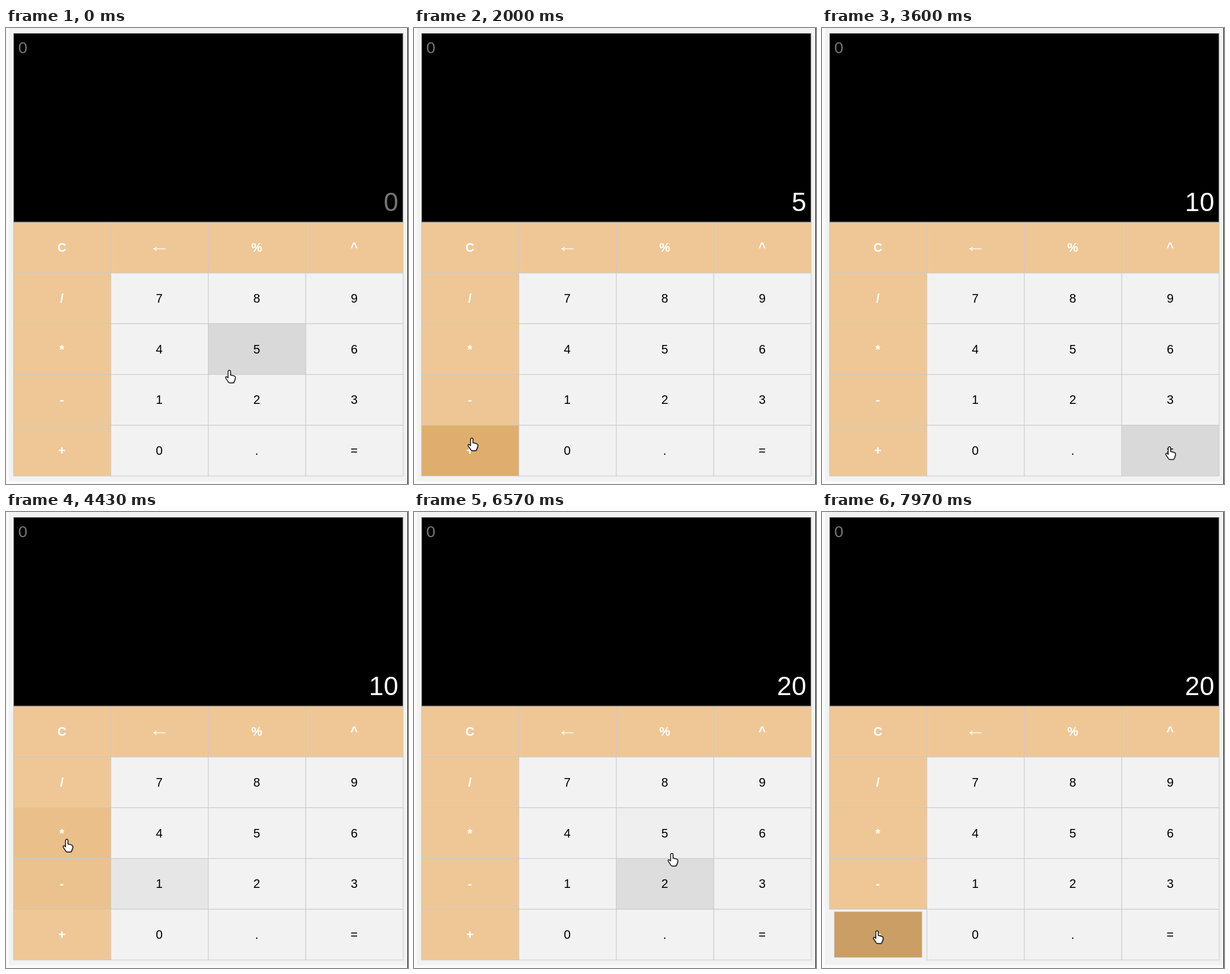
Animation, 703 px wide and 797 px high, one loop 8 s. Source, as an HTML page:

```html
<!DOCTYPE html>
<html lang="en">
<head>
<meta charset="utf-8">
<title>Calculator</title>
<style>
  html, body { margin: 0; width: 100%; height: 100%; overflow: hidden; background: #fafafb; }
  svg { display: block; width: 100vw; height: 100vh; }
  text { font-family: "Liberation Sans", Arial, sans-serif; white-space: pre; }
  .key rect { stroke: #c9c9cb; stroke-width: 1; }
  .key text { font-size: 21.5px; text-anchor: middle; }
  .op text { font-weight: bold; fill: #fff; }
  .op path { fill: none; stroke: #fff; stroke-width: 1.3; }
  .screen { fill: #000; stroke: #6c6c6c; }
  .hand { fill: #fff; stroke: #111; stroke-width: 1.5; stroke-linejoin: round; }
  .shade { fill: #000; opacity: .18; }
</style>
</head>
<body>
<svg viewBox="0 0 703 797" preserveAspectRatio="none">
  <rect x="5" width="698" height="792" fill="#f2f2f2"/>
  <rect x="702" width="1" height="797" fill="#000"/>
  <g id="keys"></g>
  <rect class="screen" x="13.5" y="9.5" width="680.5" height="329.5"/>
  <text id="history" x="21.5" y="44" font-size="28.5"></text>
  <text id="entry" x="686" y="320" font-size="46" text-anchor="end"></text>
  <g id="cursor">
    <path class="shade" transform="translate(1.5 1.5)"/>
    <path class="hand"/>
  </g>
</svg>
<script>
const LOOP = 8000, FADE = 200, HOLD = 80, STEP = 10;
const LEFT = 13, TOP = 339.5, W = 170.4, H = 88.7;
const LABELS = [...'C←%^/789*456-123+0.='];
const ORANGE = { rest: [239, 199, 150], hover: [222, 172, 108], down: '#ca9e64' };
const GREY = { rest: [242, 242, 242], hover: [217, 217, 217], down: '#bfbfbf' };
const HAND = 'M-2 2.5a2.1 2.1 0 0 1 4.2 0v6.2l3.6.7 3.5 1.2q1.6.7 1.5 2.4-.2 3.6-1.7 6.2-1 3.3-2.6 3.3h-6q-1 0-2-1.5l-4.3-6.4q-1.4-2.2.4-2.9 1.5-.4 3.4 1.9z';
const ENTRY_POINT = [390, 598];

// Each visit to a key: when the pointer sets off, how long it travels, when it presses
const VISITS = [
  { key: '5', leave: 0, travel: 430, press: 970 },
  { key: '+', leave: 1380, travel: 880, press: 2280 },
  { key: '5', leave: 2390, travel: 190, press: 2600 },
  { key: '=', leave: 2900, travel: 400, press: 3400 },
  { key: '1', leave: 3930, travel: 350 },
  { key: '*', leave: 4342, travel: 160, press: 4700 },
  { key: '2', leave: 5142, travel: 160, press: 5400 },
  { key: '=', leave: 5620, travel: 400, press: 6100 },
  { key: '5', leave: 6337, travel: 456 },
  { key: '+', leave: 6970, travel: 800, press: 7940 }
];

const COMPUTE = {
  '+': (a, b) => a + b,
  '-': (a, b) => a - b,
  '*': (a, b) => a * b,
  '/': (a, b) => a / b
};

const $ = id => document.getElementById(id);
const clamp = v => Math.max(0, Math.min(1, v));
const easeOut = (p, power) => 1 - (1 - p) ** power;

// cubic-bezier(.25, .1, .25, 1)
function ease(p) {
  if (p <= 0 || p >= 1) return clamp(p);
  let lo = 0, hi = 1, s = .5;
  for (let i = 0; i < 14; i++) {
    s = (lo + hi) / 2;
    const x = .75 * s * (1 - s) + s ** 3;
    if (x < p) lo = s; else hi = s;
  }
  return .3 * s * (1 - s) ** 2 + 3 * s * s * (1 - s) + s ** 3;
}

const keys = LABELS.map((label, i) => {
  const col = i % 4, row = Math.floor(i / 4);
  const isOp = !col || !row;
  const cx = LEFT + (col + .5) * W, cy = TOP + (row + .5) * H;
  const face = label === '←'
    ? '<path d="M10.5 2H-10M-5.5-1.5Q-7 1-10 2Q-7 3-5.5 5.5"/>'
    : `<text x="-.5" y="7.5">${label}</text>`;
  const node = document.createElementNS('http://www.w3.org/2000/svg', 'g');
  node.setAttribute('class', isOp ? 'key op' : 'key');
  node.innerHTML = `<rect x="${-W / 2}" y="${-H / 2}" width="${W}" height="${H}"/>${face}`;
  $('keys').append(node);
  return { label, node, cx, cy, rect: node.firstChild, tone: isOp ? ORANGE : GREY, events: [] };
});

function restPoint(label) {
  const { cx, cy } = keys[LABELS.indexOf(label)];
  return [cx - 2, cy - 7];
}

// The pointer settles sideways sooner than it settles vertically.
function pointer(t) {
  const i = VISITS.findLastIndex(v => v.leave <= t);
  const { key, leave, travel } = VISITS[i];
  const [x0, y0] = i ? restPoint(VISITS[i - 1].key) : ENTRY_POINT;
  const [x1, y1] = restPoint(key);
  const p = clamp((t - leave) / travel);
  return [x0 + (x1 - x0) * easeOut(p, 3.5), y0 + (y1 - y0) * easeOut(p, 2)];
}

function keyAt([x, y]) {
  return Math.floor((y - TOP) / H) * 4 + Math.floor((x - LEFT) / W);
}

// Record when the pointer enters (+1) and leaves (-1) each key.
function trackHover() {
  let over = keyAt(pointer(0));
  keys[over].events.push([-FADE, 1]);
  for (let t = STEP; t < LOOP; t += STEP) {
    const now = keyAt(pointer(t));
    if (now === over) continue;
    keys[over].events.push([t, -1]);
    keys[now].events.push([t, 1]);
    over = now;
  }
}

// The calculator's display after every press released by time t.
function screenAt(t) {
  let history = '0', entry = '0', fresh = true;
  for (const { key, press } of VISITS) {
    if (press === undefined || press + HOLD > t) continue;
    if (key === '=') {
      const [first, op] = history.split(' ');
      entry = String(COMPUTE[op](+first, +entry));
      history = '0';
      fresh = true;
    } else if (key in COMPUTE) {
      history = `${entry} ${key}`;
      entry = '0';
      fresh = true;
    } else {
      entry = fresh ? key : entry + key;
      fresh = false;
    }
  }
  return { history, entry };
}

function show(id, value) {
  $(id).textContent = value;
  $(id).setAttribute('fill', value === '0' ? '#757575' : '#fff');
}

function draw(t) {
  const held = VISITS.find(v => t >= v.press && t < v.press + HOLD);
  for (const key of keys) {
    const level = clamp(key.events.reduce((sum, [at, sign]) => sum + sign * ease((t - at) / FADE), 0));
    const pressed = held && held.key === key.label;
    const { rest, hover, down } = key.tone;
    const mix = rest.map((c, i) => Math.round(c + (hover[i] - c) * level));
    key.rect.setAttribute('fill', pressed ? down : `rgb(${mix})`);
    key.node.setAttribute('transform', `translate(${key.cx} ${key.cy}) scale(${pressed ? .9 : 1})`);
  }
  const { history, entry } = screenAt(t);
  show('history', history);
  show('entry', entry);
  $('cursor').setAttribute('transform', `translate(${pointer(t)})`);
}

document.querySelectorAll('#cursor path').forEach(p => p.setAttribute('d', HAND));
trackHover();

const start = performance.now();
function tick() {
  draw((performance.now() - start) % LOOP);
  requestAnimationFrame(tick);
}
tick();
</script>
</body>
</html>
```
